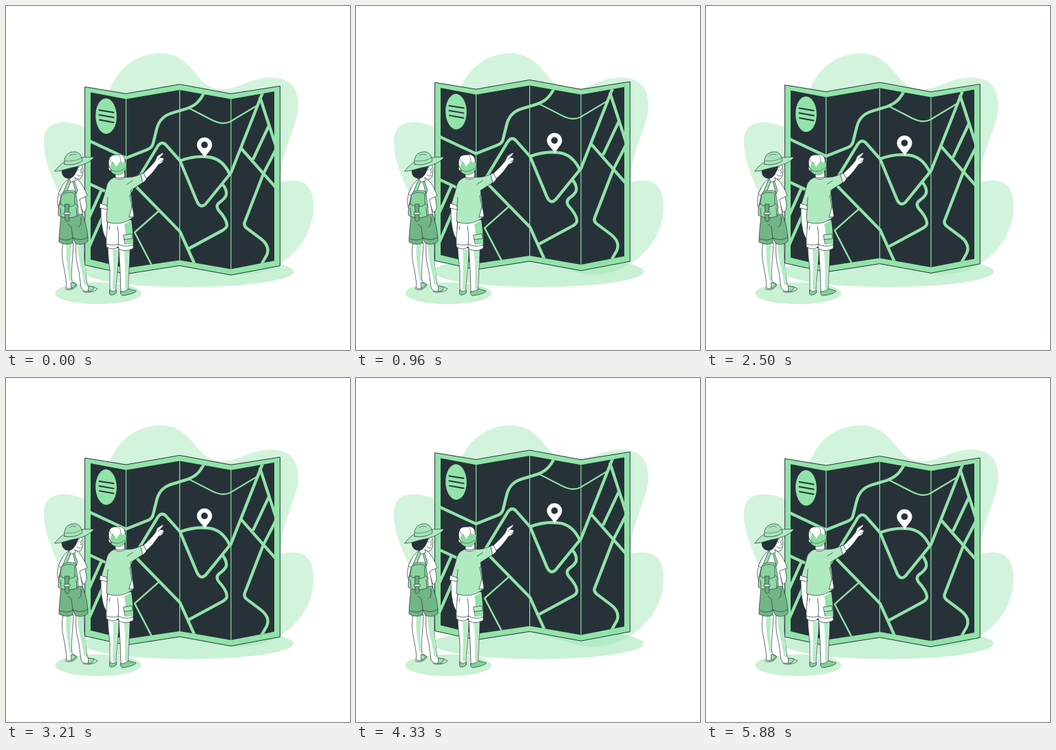
Animation of 500x500 px, one loop 5.93 s. Source, as an HTML page:

```html
<!DOCTYPE html>
<html lang="en">
<head>
<meta charset="utf-8">
<title>Travellers at a map</title>
<style>
  html, body { margin: 0; width: 100%; height: 100%; overflow: hidden; background: #fff; }
  svg { display: block; width: 100%; height: 100%; }
  .green { fill: #92e3a9; }
  .pale { fill: #b4ecc4; }
  .white { fill: #fff; }
  .dark { fill: #263238; }
  .ink { stroke: #263238; stroke-width: .7; stroke-linejoin: round; stroke-linecap: round; }
  .line { fill: none; }
  .roads { fill: none; stroke: #92e3a9; stroke-width: 4.3; stroke-linejoin: round; }
</style>
</head>
<body>
<svg viewBox="0 0 500 500">
  <defs>
    <clipPath id="sheet">
      <path id="panels" d="M123 125.5 174.5 135.2 252.5 122 327 135.2 390 124.200V370.2L327 382.5 252.5 369.4 174.5 381 123 368.5Z"/>
    </clipPath>
  </defs>

  <!-- background -->
  <path class="green" opacity=".4" d="M148 130C156 101 180 71 220 69C252 67 265 86 279 102C289 114 298 122 318 121C341 119 354 105 385 104C412 104 425 118 425 146C424 176 401 206 398 256C420 251 447 250 447 291C447 332 421 362 396 376C374 389 350 393 328 389L180 350 112 325C105 305 92 300 79 277C66 248 54 220 55 195C56 175 69 169 84 169C99 169 108 174 116 176Z"/>
  <ellipse class="green" opacity=".49" cx="265" cy="386" rx="153" ry="22.5"/>
  <ellipse cx="134" cy="417.5" rx="62.5" ry="15.8" fill="#c9f1d4"/>

  <!-- map -->
  <g id="map">
    <path class="green ink" style="stroke-width:1;stroke-linejoin:miter" d="M115 117.6 174.5 127.4 252.5 113.8 327 127.6 398.3 116.4V377.6L327 391 252.5 377.4 174.5 389.5 115 376.6Z"/>
    <use href="#panels" class="dark"/>
    <g class="roads" clip-path="url(#sheet)">
      <path d="M120 195.500 174.500 221 206 208.500Q213 205.500 214 199L219 179C222 167 228 160 240 156L263 149C274 145 281 140 288 126"/>
      <path stroke-width="2.2" d="M265 148 300 166C310 171 318 172 326 168L366 144"/>
      <path d="M172 284 221 203Q227 195.500 233 202.500L253 225 278 285Q283 294.500 290 288L327 242.500 373 126"/>
      <path d="M189 262.500 253 328 275 377"/>
      <path stroke-width="2.4" d="M222 298 187 329 213 379"/>
      <path d="M253 225Q275 217 294 219.500C310 221 320 233 325.500 245"/>
      <path d="M314 258Q322 268 320 275Q318 280 311 285Q304 290 309 297Q320 309 321 317Q322 322 315 326L265 353"/>
      <path d="M369 132 392 203M383 172 359 223M341 206 393 265"/>
      <path d="M393 207 374 244 347 314Q345 319 350 323L370 338C382 347 382 355 379 362L371 376"/>
      <path d="M120 258 148 271M139 267 121 307M121 350 146 293"/>
      <path stroke-width="1.2" d="M174.500 130V385M252.500 118V374M327 130V387"/>
    </g>
    <ellipse class="green" cx="145.500" cy="160" rx="15.300" ry="25.800" transform="rotate(-1 145.500 160)"/>
    <path class="line" stroke="#263238" stroke-width="2" stroke-linecap="round" d="M135.500 151.300 156.500 154.700M135.500 158.300 156.500 162M136 165.500 156.500 169.200"/>
    <path class="white" fill-rule="evenodd" d="M289 220.500C285 213 277.500 209 277.500 202A11 11 0 0 1 299.500 202C299.500 209 292.500 213 289 220.500ZM288.500 197A4.800 4.800 0 1 0 288.510 197Z"/>
  </g>

  <!-- woman -->
  <g class="ink">
    <path class="white" d="M102 344C101 360 102 372 106 386L109 409C112 416 119 416 123 412L118 405C116 390 113 372 113 345Z"/>
    <path class="white" d="M83 344C80 359 82 371 85 384L88 404 87 409C93 413 99 409 101 405L96 400C94 387 97 369 98 345Z"/>
    <path class="pale" stroke="none" d="M88 346H95L93 372 95 400 92 398C90 380 86 366 88 346ZM104 347H112C111 362 114 372 116 386L117 406 113 404C112 386 105 372 104 347Z"/>
    <path class="line" d="M86 411C92 415 101 411 103 405L98 402M112 415C118 418 131 415 133 411L127 408"/>
    <path class="green" d="M95 402 101 403C102 407 98 410 95 410ZM120 407 127 408C129 412 124 415 120 415Z"/>

    <path class="white" d="M109 263C114 268 116 281 117 290C117 296 115 299 112 300L107 286 105 268Z"/>
    <path class="white" d="M80 265C76 273 74 280 75 288C76 295 79 299 82 303L87 287Z"/>
    <path class="white" d="M92 250C91 253 84 255 81 263L76 273 82 277 82 307H112L107 281 118 276C115 267 111 260 107 255L101 250Z"/>
    <path fill="#72b586" d="M80 304C79 318 77 330 77 343C84 347 92 347 97 344L97 337 101 345C108 348 115 346 119 342C119 328 116 315 111 303Z"/>
    <path class="line" d="M78 338C85 341 92 341 97 337L95 321 90 317M97 337C106 341 113 340 119 336M109 307C110 316 108 320 105 321"/>
    <path class="green" d="M91 252 83 271H88L95 253ZM99 253 104 268 102 273 97 255Z"/>
    <path fill="#8fdca5" d="M82 272C86 267 97 267 101 270C103 281 105 293 105 304C98 309 83 309 76 304C76 293 78 281 82 272Z"/>
    <path fill="#87d59d" d="M81 274C86 270 97 270 100 273L100 289C95 293 83 292 79 288Z"/>
    <path fill="#67ae7c" d="M86 288H92L91 300 92 311C90 314 87 314 86 311Z"/>
    <path class="white" d="M85 300H93V303H85Z"/>
    <path class="line" d="M76 290 80 287M101 287 105 292M80 304 79 294M103 305 102 293"/>

    <path class="white" d="M98 235C103 229 111 229 111 234C113 240 111 248 108 251C105 253 101 251 100 249L101 254 94 256 91 248Z"/>
    <path class="dark" d="M82 233C79 243 83 251 92 250.500C98 250 102 243 105 233Z"/>
    <path class="line" d="M103 245Q106 249 109 246M108 238 110 242 108 243M105 237V239M109.500 236V238M105 234.500 107 234"/>
    <path fill="#aee9bf" d="M71 240C75 234 81 229 86 226L112 220 128 219.500C124 226 113 231 101 234C88 236 79 241 71 240Z"/>
    <path fill="#a6e5b8" d="M85 230C83 218 91 211 101 212C108 213 110 219 111 225C104 230 94 232 85 230Z"/>
    <path class="line" d="M86 225C94 226 104 225 110 220M92 217Q97 214 102 216" stroke-width=".5"/>
  </g>

  <!-- man -->
  <g class="ink">
    <path class="white" d="M148 350C148 363 150 374 151 385L151 416 160 417C159 399 164 379 164 352Z"/>
    <path class="white" d="M164 353C165 365 165 374 166 385L167 417 178 415C177 397 180 374 180 352Z"/>
    <path class="pale" stroke="none" d="M155 354H163C163 374 159 388 159 412L155 411C155 390 157 374 155 354ZM171 355H179C179 374 176 388 177 412L173 411C173 390 174 374 171 355Z"/>
    <path fill="#7fd398" d="M151 413C154 415 158 415 160 413C162 417 158 420 153 420C150 420 150 417 151 413ZM167 415C171 416 175 413 178 411L189 414C190 416 180 420 169 421C167 420 166 418 167 415Z"/>

    <path class="white" d="M138 291C138 304 138 313 140 322C141 330 144 337 148 341L151 333 147 324 149 292Z"/>
    <path class="white" d="M148 314C147 327 145 339 146 350C152 354 158 354 163 350L164 353C171 357 179 356 185 352C185 339 184 325 182 311Z"/>
    <path class="green" stroke="none" d="M172 317 182 312C184 325 185 339 184.600 346L173 347C174 335 174 326 172 317Z"/>
    <path class="pale" d="M171 333 183 331 184 338 172 339.500Z"/>
    <path class="line" d="M162 320C164 330 164 341 163 350M147 346C153 348 158 348 163 346C171 350 178 350 185 347M151 320 150 325M172 339 173 346"/>

    <path class="white" d="M200 243C207 237 213 230 217 225L220 218 228 213C230 214 226 218 224 220L229 221C230 225 227 229 222 230C216 238 211 246 202 252Z"/>
    <path class="line" d="M224 220 221 223M229 224 225 226"/>
    <path fill="#b0eac0" d="M158 249C152 251 147 256 146 263C143 274 140 283 138 290L147 293 146 313C156 318 171 317 182 309L186 306 181 268 203 254 198 243C191 247 184 249 177 249Z"/>
    <path class="white" d="M137 287 147 290V296L136 293.500ZM196 244 200 243 204 252 199 257Z"/>
    <path class="white" d="M183.500 291 186 306 179 307Z"/>
    <path class="line" d="M147 291 148 278M180 276C184 270 188 266 190 263M180 276 183 292M176 259 184 254"/>
    <path class="white" d="M159 241V250C163 253 169 252 173 249L172 240Z"/>
    <path class="line" d="M158 248C163 251 169 250 174 247"/>
    <path class="white" d="M152 239C149 233 148 225 151 220C154 215 161 217 164 216C170 215 174 221 173 227C176 235 173 243 165 245C159 246 154 243 152 239Z"/>
    <path fill="#88dda0" stroke="none" d="M152 239C151 234 152 229 155 226Q158 229 160 234Q163 229 167 225Q171 229 174 228C175 237 172 243 165 244.500C159 245 154 243 152 239Z"/>
    <path class="line" stroke-width=".5" d="M153 238C159 242 167 241 173 235M164 217Q168 221 166 226M151 222Q152 227 155 228"/>
    <path class="white" d="M150 234C148 234 149 240 153 240Z"/>
  </g>
</svg>
<script>
  const map = document.getElementById('map');
  const LOOP = 5930, STEP = 1000 / 24, PERIOD = 3000, RISE = 10;

  // Linear rise and fall, held on 24 fps steps and begun one step in.
  function lift(time) {
    const frame = Math.min(141, Math.floor((time + 5) / STEP));
    const phase = (frame + 1) * STEP % PERIOD / PERIOD;
    return RISE * (1 - Math.abs(1 - 2 * phase));
  }

  const restShift = lift(0);

  function draw(now) {
    const y = restShift - lift(now % LOOP);
    map.setAttribute('transform', `translate(0 ${y.toFixed(3)})`);
  }

  let start;
  function tick(now) {
    start ??= now;
    draw(now - start);
    requestAnimationFrame(tick);
  }

  draw(0);
  requestAnimationFrame(tick);
</script>
</body>
</html>
```
